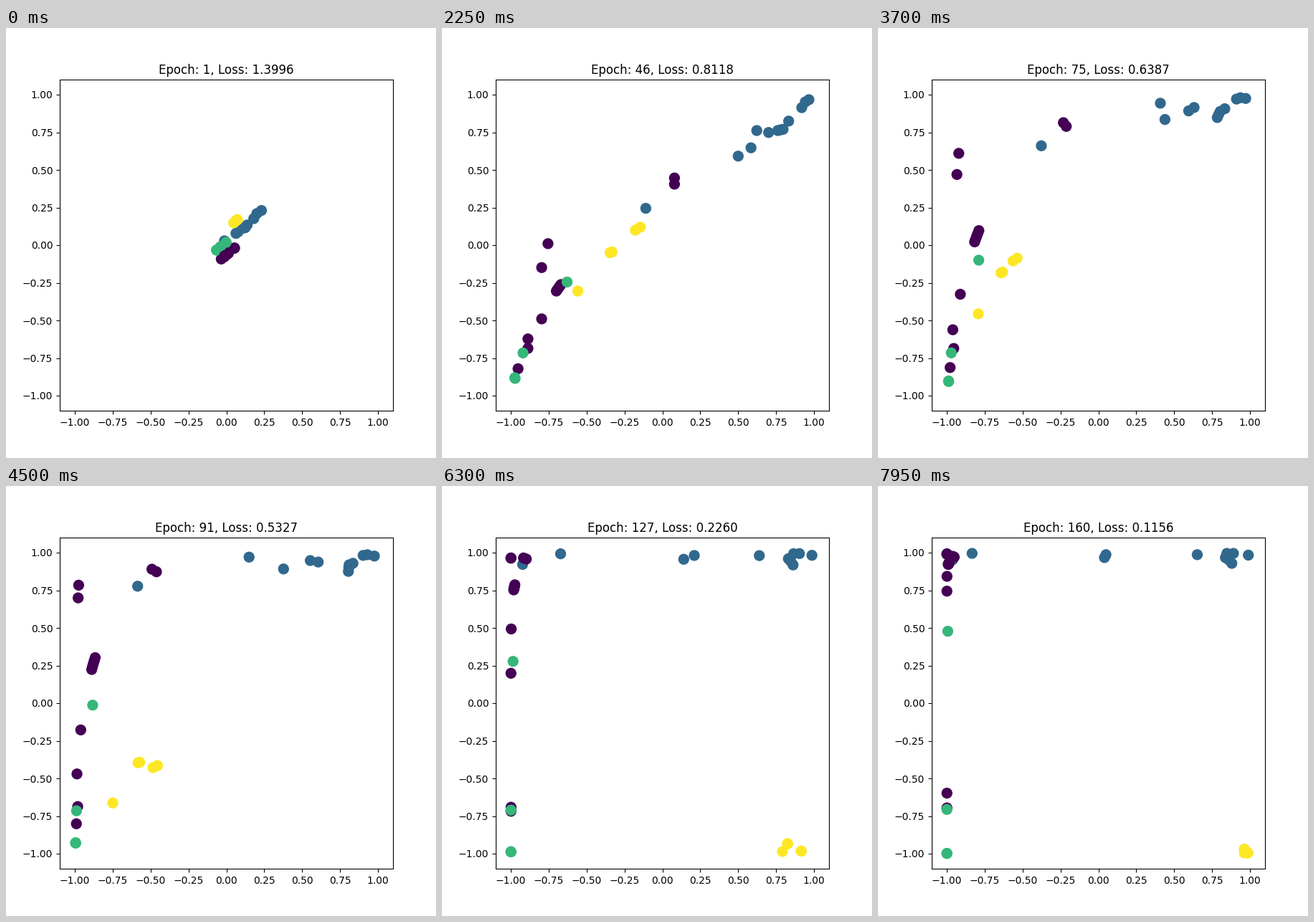
These frames come from a looping animation (600 px wide and 600 px high, 8000 ms). A matplotlib script:

```python
import numpy as np
import matplotlib.pyplot as plt
from matplotlib.animation import FuncAnimation

EPOCHS = 160
KEYS = np.array([1, 23, 46, 60, 91, 127, 160])
LOSS = [1.3996, 1.0730, 0.8118, 0.7185, 0.5327, 0.2260, 0.1156]

# Share of the way from home to goal at the key epochs 46 to 160.
# Most nodes climb later the lower their home lies, hence the tilt.
PULL_X = [0, 0.056, 0.30, 0.80, 1]
PULL_Y = [0, 0.14, 0.40, 0.77, 1]
TILT_Y = [0, 0.16, 0.37, 0.30, 0]
# The fourth class swings back before it breaks away.
SWING_X = [0, -0.10, -0.13, 0.65, 1]
SWING_Y = [0, 0.02, 0.18, 0.80, 1]


def spread(a, b, n):
    return [tuple(row) for row in np.linspace(a, b, n)]


# Node: home x, y and goal x, y, all before the tanh.
blue = [
    (-0.11, 0.25, -1.98, 1.85),
    (0.73, 1.00, -1.20, 3.0),
    (0.55, 0.68, 0.04, 2.05),
    (0.67, 0.77, 0.78, 2.5),
    (0.87, 0.97, 0.05, 2.5),
    (2.05, 2.04, 2.65, 2.4),
    (1.77, 1.85, 1.43, 3.0),
    (1.59, 1.55, 1.25, 3.0),
    (1.20, 1.17, 1.22, 2.05),
    *spread((1.00, 1.00, 1.38, 1.65), (1.09, 1.02, 1.22, 2.05), 3),
]
yellow = [
    *spread((-0.18, 0.10, 2.5, -3.0), (-0.147, 0.12, 2.5, -3.0), 2),
    *spread((-0.36, -0.05, 2.0, -2.1), (-0.345, -0.045, 2.0, -2.1), 2),
    (-0.63, -0.315, 2.0, -3.0),
]
purple = [
    *spread((0.08, 0.48, -1.98, 2.2), (0.08, 0.43, -1.85, 2.1), 2),
    (-0.985, 0.01, -5.0, 2.6),
    (-1.09, -0.15, -5.0, 2.8),
    (-1.41, -0.84, -4.5, -0.86),
    (-1.86, -1.16, -4.5, -0.69),
    *spread((-0.867, -0.315, -2.7, 1.6), (-0.81, -0.268, -2.5, 1.66), 5),
]
purple_top = [
    (-1.09, -0.536, -4.0, 1.23),
    (-1.41, -0.73, -5.0, 0.96),
]
green = [
    (-0.74, -0.25, -2.9, 0.52),
    (-1.59, -0.90, -5.0, -0.88),
    *spread((-2.13, -1.40, -5.0, -3.5), (-2.17, -1.38, -5.0, -3.5), 2),
]

# Scale of the home layout and shift, at the first and second key epochs.
BLUE_START = [(0.115, 0, 0), (0.47, 0.02, 0)]
YELLOW_START = [(0.05, 0.08, 0.165), (0.30, 0.20, 0.25)]
PURPLE_START = [(0.045, 0.05, -0.04), (0.33, 0.02, 0.04)]
GREEN_START = [(0.045, 0.032, 0.03), (0.37, 0.05, 0.10)]

# Back to front: nodes, viridis level, start.
LAYERS = [
    (blue, 1 / 3, BLUE_START),
    (yellow, 1.0, YELLOW_START),
    (purple, 0.0, PURPLE_START),
    (green, 2 / 3, GREEN_START),
    (purple_top, 0.0, PURPLE_START),
]


def key_poses(nodes, start, swing):
    """Positions before the tanh at every key epoch, as (key, node, xy)."""
    nodes = np.array(nodes)
    home, goal = nodes[:, :2], nodes[:, 2:]
    height = np.clip(home[:, 1], -0.75, 0.4)
    poses = [scale * home + (dx, dy) for scale, dx, dy in start]
    for k in range(len(PULL_X)):
        if swing:
            share = np.array([SWING_X[k], SWING_Y[k]])
        else:
            share_y = PULL_Y[k] + TILT_Y[k] * height
            share = np.column_stack([np.full_like(share_y, PULL_X[k]), share_y])
        poses.append(home + share * (goal - home))
    return np.array(poses)


def spline(keys, values, t):
    """Cubic Hermite curve through values (first axis) at all times t."""
    values = np.asarray(values, float)
    slopes = np.gradient(values, keys, axis=0)
    i = np.clip(np.searchsorted(keys, t, side="right") - 1, 0, len(keys) - 2)
    shape = (-1,) + (1,) * (values.ndim - 1)
    h = (keys[i + 1] - keys[i]).reshape(shape)
    u = (t - keys[i]).reshape(shape) / h
    return ((1 + 2 * u) * (1 - u) ** 2 * values[i]
            + u * (1 - u) ** 2 * h * slopes[i]
            + u ** 2 * (3 - 2 * u) * values[i + 1]
            + u ** 2 * (u - 1) * h * slopes[i + 1])


epochs = np.arange(1, EPOCHS + 1)
poses = np.concatenate([key_poses(nodes, start, nodes is yellow)
                        for nodes, _, start in LAYERS], axis=1)
path = np.tanh(spline(KEYS, poses, epochs))
loss = np.exp(spline(KEYS, np.log(LOSS), epochs))
levels = np.concatenate([np.full(len(nodes), level) for nodes, level, _ in LAYERS])

fig, ax = plt.subplots(figsize=(6, 6), dpi=100)
ax.set_xlim(-1.1, 1.1)
ax.set_ylim(-1.1, 1.1)
dots = ax.scatter(path[0, :, 0], path[0, :, 1], s=100, c=plt.cm.viridis(levels))
title = ax.set_title("")


def draw(i):
    dots.set_offsets(path[i])
    title.set_text(f"Epoch: {epochs[i]}, Loss: {loss[i]:.4f}")
    return dots, title


anim = FuncAnimation(fig, draw, frames=EPOCHS, interval=50, repeat=True,
                     repeat_delay=0, blit=False)
plt.show()
```
